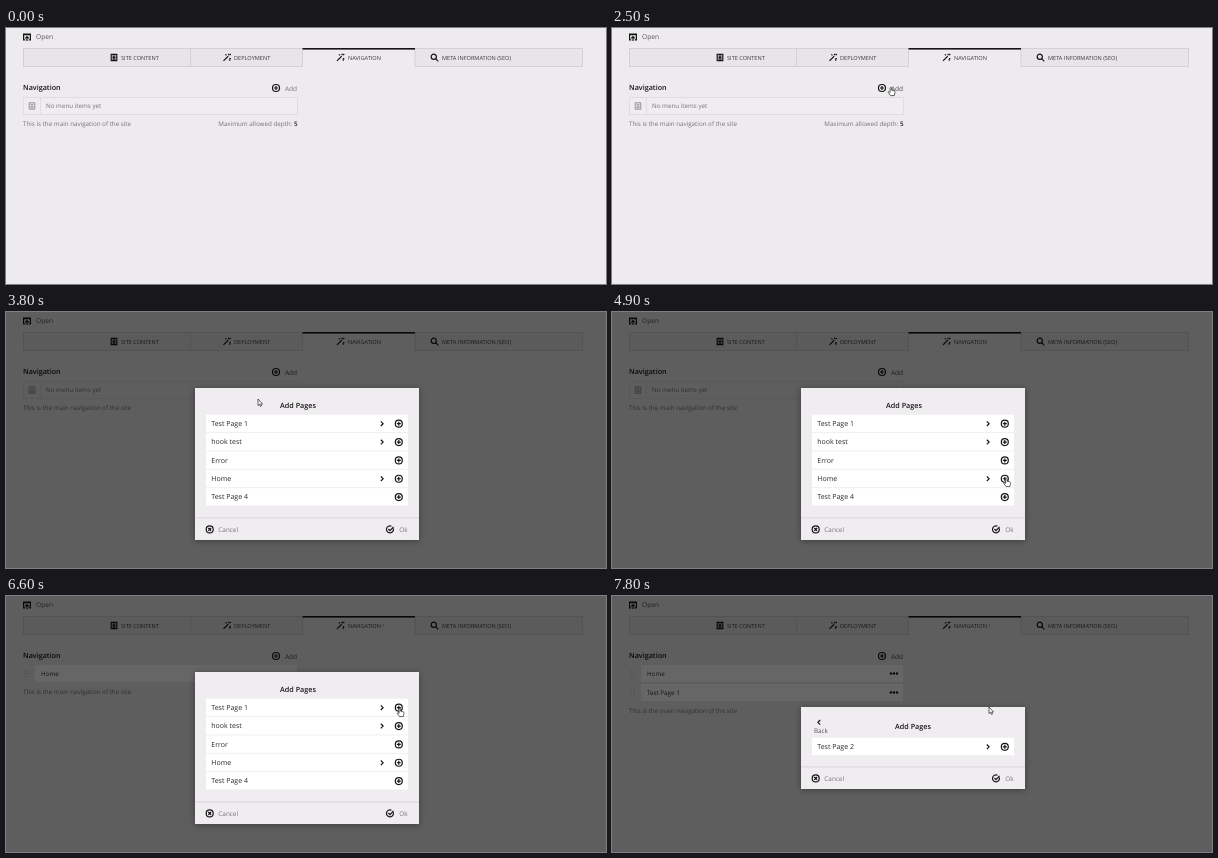
An HTML page for the animation above (8000 ms loop, 600x256 px).

```html
<!DOCTYPE html>
<html lang="en">
<head>
<meta charset="utf-8">
<title>Navigation field</title>
<style>
  html, body { margin: 0; width: 100%; height: 100%; overflow: hidden; background: #edebed; }
  svg { display: block; width: 100vw; height: 100vh; }
  text { font-family: "Open Sans", "Noto Sans", sans-serif; text-rendering: geometricPrecision; white-space: pre; }
  .bold { font-weight: 600; }
  .icon { fill: none; stroke: #161516; stroke-width: 1.2; }
  .shadow { filter: drop-shadow(0 1px 3px rgba(0, 0, 0, .35)); }
</style>
</head>
<body>
<svg id="stage" viewBox="0 0 600 256"></svg>
<script>
const LOOP = 8000, STEP = 100;
const INK = '#161516', SOFT = '#777577', PAPER = '#edebed', LINE = '#d3d1d3';

const text = (x, y, size, value, fill = INK, extra = '') =>
  `<text x="${x}" y="${y}" font-size="${size}" fill="${fill}" ${extra}>${value}</text>`;
const rect = (x, y, w, h, fill, extra = '') =>
  `<rect x="${x}" y="${y}" width="${w}" height="${h}" fill="${fill}" ${extra}/>`;
const icon = (x, y, d, extra = '') =>
  `<path class="icon" transform="translate(${x} ${y})" d="${d}" ${extra}/>`;
const group = (id, content, extra = '') => `<g id="${id}" ${extra}>${content}</g>`;
const dots = (xs, ys, r, fill) =>
  ys.flatMap(y => xs.map(x => `<circle cx="${x}" cy="${y}" r="${r}" fill="${fill}"/>`)).join('');

const RING = 'M-3.5 0a3.5 3.5 0 1 0 7 0a3.5 3.5 0 1 0-7 0';
const ICONS = {
  plus: RING + 'M-2 0H2M0-2V2',
  cross: RING + 'M-1.4-1.4L1.4 1.4M1.4-1.4L-1.4 1.4',
  check: 'M3.3-1A3.5 3.5 0 1 1 1.5-3.1M-1.6-.4L0 1.2L3.5-2.6',
  next: 'M-1.2-2.3L1.1 0L-1.2 2.3',
  back: 'M1.2-2.3L-1.1 0L1.2 2.3',
  open: 'M-1.8 2.9H-3.4V-3H3.4V2.9H1.8M-3.4-2.3H3.4M0 4V-.2M-1.8 1.4L0-.4L1.8 1.4',
  page: 'M-2.8-3.2H2.8V3.2H-2.8ZM-1.5-1.3H1.5M-1.5.2H1.5M-1.5 1.7H1.5',
  wand: 'M-3.5 3.4L1.2-1.2M1.6-3.8V-2.3M3.9 1.1H2.4M3.8-3.5L2.6-2.4M-1.6-3.2L-.5-2.1M3.2 3L2.2 2',
  search: 'M-3.3-.7a2.6 2.6 0 1 0 5.2 0a2.6 2.6 0 1 0-5.2 0M1.2 1.2L3.8 3.8'
};

function tabs() {
  const items = [['page', 108, 115, 'SITE CONTENT'], ['wand', 221, 228, 'DEPLOYMENT'],
    ['wand', 334.5, 342, 'NAVIGATION'], ['search', 428.5, 436, 'META INFORMATION (SEO)']];
  return rect(17.5, 20.5, 559, 18, '#e7e5e7', `stroke="${LINE}"`) +
    rect(184, 21, 1, 17, LINE) +
    rect(296.5, 20, 112.5, 19, PAPER) +
    rect(296, 20, 1, 19, LINE) + rect(408.5, 20, 1, 19, LINE) +
    rect(296.5, 20, 112.5, 1.6, INK) +
    items.map(([name, ix, tx, label]) =>
      icon(ix, 29.5, ICONS[name]) + text(tx, 31.6, 5.6, label, '#3c3a3c')).join('') +
    group('badge', text(376, 30.6, 4, '1', '#555355'));
}

function menuRow(id, y, label) {
  return group(id, rect(29, y, 262, 17, '#fff') +
    dots([18.9, 22], [y + 6, y + 8.5, y + 11], .5, '#a5a3a5') +
    text(35, y + 10.8, 6.25, label, '#333133') +
    dots([279, 282, 285], [y + 8.5], 1.2, INK));
}

function page() {
  return icon(21, 9, ICONS.open) + text(30, 11.4, 6.6, 'Open', '#555355') + tabs() +
    text(17, 61.6, 7.2, 'Navigation', INK, 'class="bold"') +
    icon(270, 60, ICONS.plus) + text(279, 62.5, 6.5, 'Add', SOFT, 'id="add"') +
    group('empty', rect(17.5, 69.5, 274, 17, '#efedef', 'stroke="#dfdddf"') +
      rect(34, 70, 1, 16, '#dfdddf') +
      icon(26, 78, ICONS.page, 'style="stroke:#8b898b;stroke-width:.9"') +
      text(40, 80.3, 6.25, 'No menu items yet', SOFT)) +
    menuRow('row1', 69, 'Home') + menuRow('row2', 88, 'Test Page 1') +
    group('hint', text(17, 97.7, 6.25, 'This is the main navigation of the site', SOFT) +
      text(291.5, 97.7, 6.25, `Maximum allowed depth: <tspan class="bold" fill="${INK}">5</tspan>`,
        SOFT, 'text-anchor="end"'));
}

function dropdown() {
  const lines = (y, list) => list.map((s, i) => text(214.3, y + i * 6.5, 4.7, s, '#e6e4e6')).join('');
  return rect(207, 69, 84.5, 76.5, '#111011', 'class="shadow"') +
    text(214.3, 81.5, 6.25, 'Vintu Link', '#fff') +
    lines(90.7, ['Adds a Vintu page to the', 'menu']) +
    text(214.3, 114.6, 6.25, 'Custom Link', '#fff') +
    lines(123.7, ['Adds a custom link to the', 'menu, useful for external urls', 'etc']);
}

function dialog(top, bottom, titleX, titleY, firstRow, rows) {
  const foot = bottom - 10;
  return rect(189, top, 224, bottom - top, '#efedef', 'class="shadow"') +
    text(titleX, titleY, 7.2, 'Add Pages', INK, 'class="bold" text-anchor="middle"') +
    rows.map(([label, nested], i) => {
      const y = firstRow + i * 18.35;
      return rect(200, y, 202, 17.4, '#fff') + text(205.3, y + 11.3, 7, label, '#2b292b') +
        (nested ? icon(376, y + 9, ICONS.next) : '') + icon(392.8, y + 9, ICONS.plus);
    }).join('') +
    rect(189, bottom - 22.5, 224, .8, LINE) +
    icon(203.7, foot - .6, ICONS.cross) + text(212.3, foot + 2.2, 6.4, 'Cancel', SOFT) +
    icon(384, foot - .6, ICONS.check) + text(393.3, foot + 2.2, 6.4, 'Ok', SOFT);
}

const pointer = 'M0 0V6.6L1.5 5.3L2.5 7.5L3.5 7L2.6 5H4.5Z';
const hand = 'M.1.7Q.9-.5 1.6.7V3.2L4.2 3.8Q5.3 4.2 5 5.6L4.3 8.6H.6L-1.7 5.6Q-1.9 4.5-.9 4.7L.1 5.4Z';

const stage = document.getElementById('stage');
stage.innerHTML = rect(0, 0, 600, 256, PAPER) + page() + group('dropdown', dropdown()) +
  rect(0, 0, 600, 256, '#000', 'id="shade" opacity=".6"') +
  group('list', dialog(76, 228, 292, 96.1, 102.7,
    [['Test Page 1', 1], ['hook test', 1], ['Error', 0], ['Home', 1], ['Test Page 4', 0]])) +
  group('nested', dialog(111, 193, 301, 132.6, 141.8, [['Test Page 2', 1]]) +
    icon(207, 126.3, ICONS.back) + text(202, 137.2, 6.25, 'Back', '#555355')) +
  `<path id="cursor" fill="#fff" stroke="#222" stroke-width=".7" stroke-linejoin="round"/>`;

// Pointer stops: time, x, y
const path = [
  [900, 101, 47], [1100, 205, 122], [1300, 284, 154], [1500, 296, 133], [1600, 295, 131],
  [1900, 295, 131], [2300, 271, 66], [2500, 278, 59], [3000, 278, 59], [3400, 254, 87],
  [3700, 254, 87], [3800, 252, 87], [4100, 252, 87], [4700, 395, 163], [5000, 393, 167],
  [5200, 393, 167], [5800, 380, 117], [5900, 380, 116], [6000, 381, 116], [6600, 393, 112],
  [6900, 393, 112], [7300, 379, 112], [7400, 379, 112], [7500, 378, 111], [7700, 378, 111],
  [7800, 377, 111], [LOOP, 377, 111]
];
const handSpans = [[2400, 3800], [4800, 5400], [6400, 7100], [7500, 7800]];

function pointerAt(t) {
  const i = path.findIndex(p => p[0] > t);
  if (i < 1) return path[0].slice(1);
  const [a, b] = [path[i - 1], path[i]];
  const k = (t - a[0]) / (b[0] - a[0]), ease = k * k * (3 - 2 * k);
  return [1, 2].map(n => a[n] + (b[n] - a[n]) * ease);
}

const el = id => document.getElementById(id);
const show = (id, on) => el(id).setAttribute('visibility', on ? 'visible' : 'hidden');

function render(now) {
  const t = Math.floor(now % LOOP / STEP) * STEP;
  const added = t >= 5200, second = t >= 6900;
  show('dropdown', t >= 2900 && t < 3800);
  show('shade', t >= 3800);
  show('list', t >= 3800 && t < 7800);
  show('nested', t >= 7800);
  show('empty', !added);
  show('row1', added);
  show('row2', second);
  show('badge', added);
  el('hint').setAttribute('transform', `translate(0 ${second ? 19 : 0})`);
  el('add').setAttribute('fill', t >= 2400 ? '#4a484a' : SOFT);

  const [x, y] = pointerAt(t);
  show('cursor', t >= 900);
  el('cursor').setAttribute('d', handSpans.some(([a, b]) => t >= a && t < b) ? hand : pointer);
  el('cursor').setAttribute('transform', `translate(${x.toFixed(2)} ${y.toFixed(2)})`);
}

const start = performance.now();
function tick() {
  render(performance.now() - start);
  requestAnimationFrame(tick);
}
tick();
</script>
</body>
</html>
```
